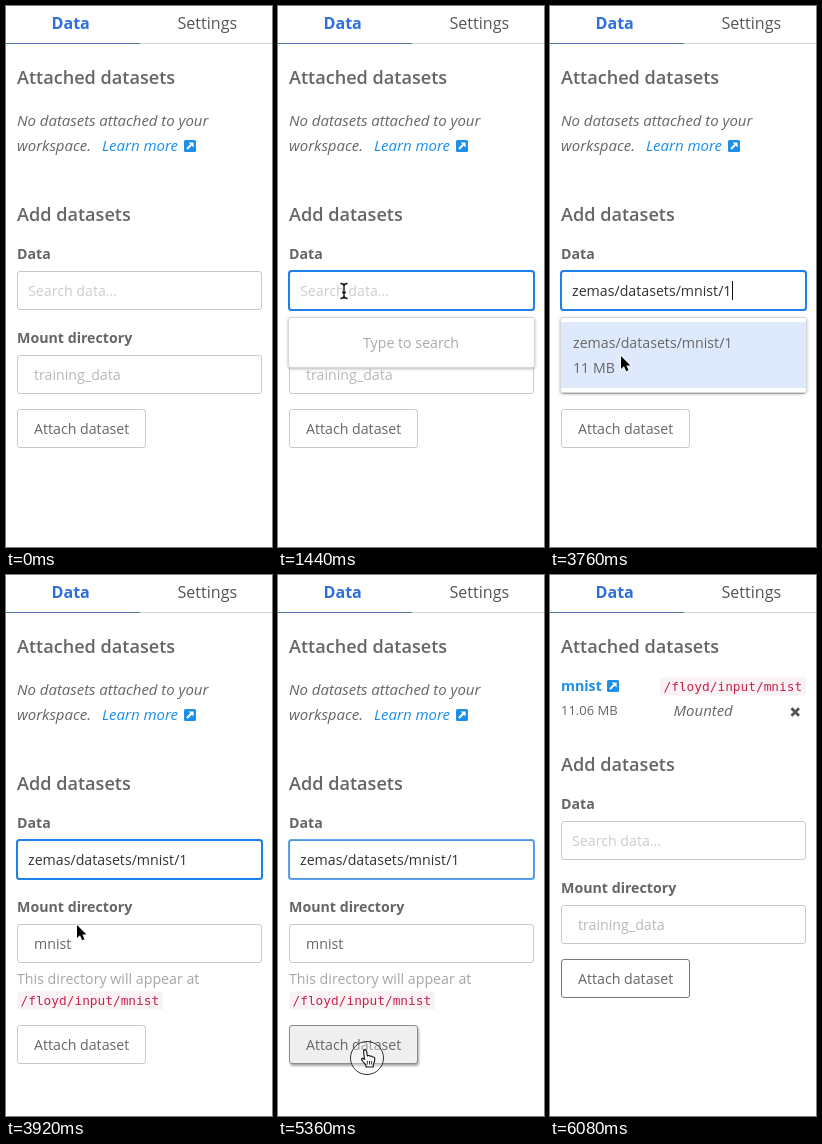
Animation, 266 px wide and 541 px high, one loop 8.08 s. Source, as an HTML page:

```html
<!DOCTYPE html>
<html lang="en">
<head>
<meta charset="utf-8">
<title>Attach a dataset</title>
<style>
  html, body { margin: 0; width: 100%; height: 100%; overflow: hidden; background: #fff; }
  svg { display: block; width: 266px; height: 541px; }
  text { font: 14.2px "Open Sans", sans-serif; fill: #666; white-space: pre; }
  .tab { font-size: 16.1px; fill: #555; }
  .on { font-weight: 700; fill: #2f6fdb; }
  .head { font-size: 18.1px; font-weight: 600; }
  .bold { font-weight: 700; }
  .it { font-size: 15px; font-style: italic; }
  .link { fill: #1c8fea; }
  .hint { fill: #a6a6a6; }
  .ph { fill: #ccc; }
  .ph2 { fill: #b8b8b8; }
  .val { fill: #333; }
  .mid { text-anchor: middle; fill: #aaa; }
  .small { font-size: 13px; }
  .code { font: 12.8px "DejaVu Sans Mono", monospace; fill: #c7254e; }
  .lift { filter: drop-shadow(0 1px 1.5px rgba(0,0,0,.28)); }
  .press { filter: drop-shadow(1px 2px 1px rgba(0,0,0,.35)); }
</style>
</head>
<body>
<svg id="stage" viewBox="0 0 266 541"></svg>
<script>
const LOOP = 8080, STEP = 80;
const DATASET = 'zemas/datasets/mnist/1', MOUNT = '/floyd/input/mnist';
const T = { focus: 960, menu: 1040, paste: 1840, found: 3200, pick: 3920, blur: 5280, attach: 5600, mounted: 5840, gone: 6080 };

// Pointer hot spot: time, x, y
const PATH = [
  [80, 44, 418], [400, 52, 345], [720, 63, 287], [880, 65, 286], [960, 66, 285],
  [3360, 66, 285], [3520, 67, 305], [3760, 71, 350], [4320, 71, 350],
  [4560, 85, 371], [4640, 85, 371], [4960, 87, 425], [5280, 87, 475]
];
const CARET = [[960, 1440], [1840, 2320], [2800, 3280], [3760, 3920]];
const CLICKS = [[880, 960], [3840, 3920], [5280, 5600]];

const clamp = v => Math.max(0, Math.min(1, v));
const within = (t, spans) => spans.some(([a, b]) => t >= a && t < b);
const text = (x, y, cls, s) => `<text x="${x}" y="${y}" class="${cls}">${s}</text>`;
const rect = (x, y, w, h, fill, stroke = 'none', extra = '') =>
  `<rect x="${x}" y="${y}" width="${w}" height="${h}" rx="2.5" fill="${fill}" stroke="${stroke}" ${extra}/>`;
const group = (x, y, body, opacity = 1) =>
  `<g transform="translate(${x} ${y})" opacity="${opacity}">${body}</g>`;

const icon = (x, y) => group(x, y,
  `<rect width="12" height="12" rx="1.5" fill="#1c8fea"/>
   <path d="M3 9L8 4" stroke="#fff" stroke-width="2"/><path d="M4.6 2.4H9.6V7.4Z" fill="#fff"/>`);
const code = (x, y) => rect(x, y - 13.5, 146, 18, '#f9f2f4') + text(x + 3.5, y, 'code', MOUNT);

function pointerAt(t) {
  const i = PATH.findIndex(k => k[0] > t);
  if (i < 0) return PATH[PATH.length - 1].slice(1);
  const [a, x, y] = PATH[i - 1], [b, x2, y2] = PATH[i];
  const p = (t - a) / (b - a);
  return [x + (x2 - x) * p, y + (y2 - y) * p];
}

function pointerKind(t, y) {
  const menuOpen = t >= T.menu && t < 4240;
  if (t > 4640 && t < T.attach && y > 450) return 'hand';
  if (y > 265 && y < 304 || !menuOpen && y > 349 && y < 388) return 'beam';
  if (t >= 4240 && t < 4640) return 'beam';
  return 'arrow';
}

const BEAM = 'M-3.5-7.5Q0-7.5 0-5Q0-7.5 3.5-7.5M0-5V5M-3.5 7.5Q0 7.5 0 5Q0 7.5 3.5 7.5M-2 1.5H2';
const SHAPES = {
  arrow: '<path d="M0 0V13L3 10.3 5.2 15.2 7.5 14.2 5.4 9.4H9.4Z" stroke="#fff" paint-order="stroke" stroke-width="1.4"/>',
  beam: `<g fill="none"><path d="${BEAM}" stroke="#fff" stroke-width="3" opacity=".7"/><path d="${BEAM}" stroke="#111" stroke-width="1.4"/></g>`,
  hand: `<path d="M-1.5 1Q0-1.2 1.6 1L2.3 6Q4 4.8 5 6.3Q6.8 5.5 7.5 7Q9.8 6.6 9.8 9Q9.8 12 8.3 14.5V17H1V15Q-1.5 12.5-3.5 9.7Q-3.3 7.3-.5 9.3Z"
    fill="#fff" stroke="#111" stroke-width="1.1" stroke-linejoin="round"/><path d="M2.3 11V14.5M4.5 11V14.5M6.7 11V14.5" stroke="#111" stroke-width=".9"/>`
};
const CENTRE = { arrow: [3, 7], beam: [0, 0], hand: [2, 8] };

function pointer(t) {
  if (t < 80 || t >= T.gone) return '';
  const [x, y] = pointerAt(t), kind = pointerKind(t, y), [cx, cy] = CENTRE[kind];
  const ring = within(t, CLICKS)
    ? `<circle cx="${cx}" cy="${cy}" r="16.5" fill="#fff" fill-opacity=".35" stroke="#333"/>` : '';
  return group(x, y, ring + SHAPES[kind], clamp((T.gone - t) / 320));
}

function header(t) {
  let s = text(45.5, 23, 'tab on', 'Data') + text(171.5, 23, 'tab', 'Settings')
    + '<path d="M134 37.5H266" stroke="#d4d4d4"/><path d="M0 37.5H134" stroke="#5474ae"/>'
    + text(11, 78, 'head', 'Attached datasets');
  if (t < T.attach) {
    return s + text(11, 120, 'it', 'No datasets attached to your') + text(11, 145, 'it', 'workspace.')
      + text(96, 145, 'it link', 'Learn more') + icon(178, 134);
  }
  s += text(11, 116, 'bold link', 'mnist') + icon(57, 105) + code(110, 116);
  if (t >= T.mounted) {
    s += text(11, 140, 'small', '11.06 MB') + text(123.5, 141, 'it', 'Mounted')
      + '<path d="M241.5 133.2L249 140.8M249 133.2L241.5 140.8" stroke="#555" stroke-width="2.8"/>';
  }
  return s;
}

function menu(t) {
  if (t < T.menu || t >= T.pick) return '';
  const found = t >= T.found;
  const box = rect(10.5, 311.5, 246, found ? 75 : 50, '#fff', '#d8d8d8', 'class="lift"');
  if (!found) return box + text(133, 342, 'mid', t < T.paste ? 'Type to search' : 'Loading...');
  return box + `<path d="M11 316H256V382H11Z" fill="#deeafc"/>`
    + text(23, 342, '', DATASET) + text(23, 367, '', '11 MB');
}

function form(t) {
  const filled = t >= T.paste && t < T.attach, picked = t >= T.pick && t < T.attach;
  const hover = picked && t > 4640 && pointerAt(t)[1] > 450;
  const done = t >= T.attach, drop = picked ? 47 : 0;
  const glow = t < T.focus ? 0 : clamp(1 - (t - T.blur) / 240 * .9);

  let s = text(11, 215, 'head', 'Add datasets') + text(11, 253, 'bold', 'Data')
    + rect(11.5, 265.5, 244, 38, '#fff', '#c8c8c8');
  if (glow && !done) s += rect(11, 265, 245, 39, 'none', '#1f7fec', `stroke-width="2" opacity="${glow}"`);
  s += filled ? text(22, 290, 'val', DATASET) : text(22, 290, 'ph', 'Search data...');
  if (within(t, CARET)) s += `<path d="M${filled ? 182.5 : 22.5} 275V294" stroke="#111"/>`;

  s += text(11, 337, 'bold', 'Mount directory') + rect(11.5, 349.5, 244, 38, '#fff', '#c8c8c8')
    + (picked ? text(28, 374, '', 'mnist') : text(28, 374, 'ph2', 'training_data'));
  if (picked) s += text(11, 409, 'hint', 'This directory will appear at') + code(11, 430);

  s += rect(11.5, 403.5 + drop, 128, 38, hover ? '#efefef' : '#fff',
      hover ? '#8c8c8c' : done ? '#777' : '#c8c8c8', hover ? 'class="press"' : '')
    + text(28, 428 + drop, '', 'Attach dataset') + menu(t);
  return group(0, t >= T.mounted ? -19 : 0, s);
}

const stage = document.getElementById('stage');
let shown = -1;
function frame(now) {
  const t = Math.floor(now % LOOP / STEP) * STEP;
  if (t !== shown) {
    shown = t;
    stage.innerHTML = header(t) + form(t) + pointer(t);
  }
  requestAnimationFrame(frame);
}
frame(0);
</script>
</body>
</html>
```
